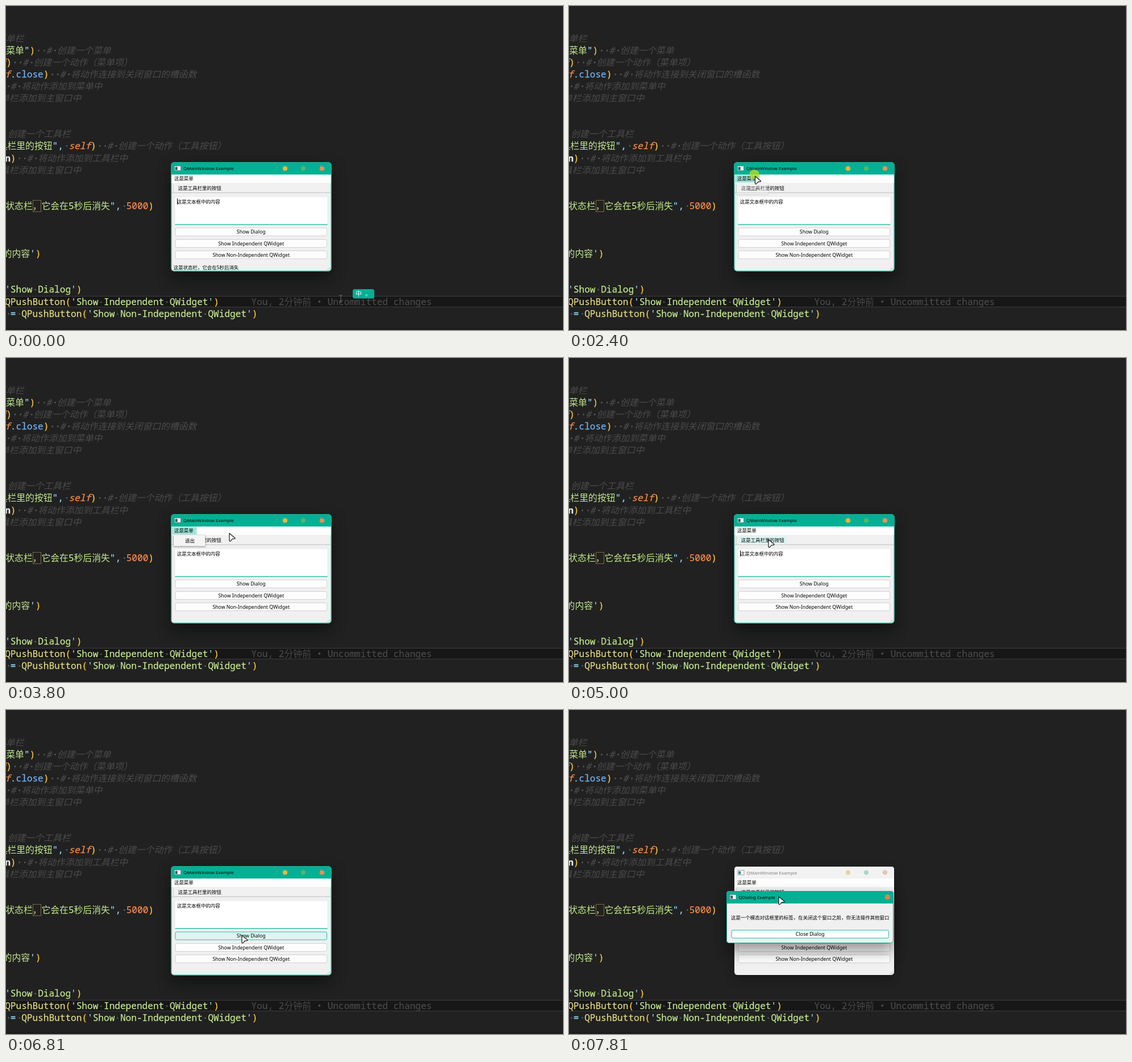
Recreate the animation shown at these times as an HTML page. Size 980 by 571 pixels, loop 8 s.

```html
<!DOCTYPE html>
<html lang="zh-CN">
<head>
<meta charset="utf-8">
<style>
html, body { margin: 0; width: 100%; height: 100%; overflow: hidden; background: #212121; }
svg { display: block; width: 980px; height: 571px; }
text { white-space: pre; }
.code { font: 16.1px 'Noto Sans Mono', 'Noto Sans CJK SC', 'Noto Sans CJK', monospace; stroke-width: .25; }
.han { font-size: 15.8px; stroke: none; }
.space { fill: #5c5c5c; stroke: #5c5c5c; stroke-width: .7; }
.ui { font: 8.45px 'Noto Sans', 'Noto Sans CJK SC', 'Noto Sans CJK', sans-serif; fill: #000; }
.ui .title { font-size: 7.95px; }
.ui .label { font-size: 8.73px; text-anchor: middle; }
</style>
</head>
<body>
<svg viewBox="0 0 980 571">
  <rect width="980" height="571" fill="#212121"/>
  <rect y="567" width="980" height="4" fill="#1d1d1d"/>
  <rect x="-2" y="511.5" width="984" height="19" fill="#171717" stroke="#3c3c3c"/>
  <g id="code" class="code"></g>
  <rect x="47.5" y="342.5" width="14" height="20" fill="none" stroke="#806a35"/>
  <g id="main" class="ui"></g>
  <g id="popup" class="ui"></g>
  <g id="dialog" class="ui"></g>
  <g id="ime" class="ui">
    <rect x="610" y="499" width="38" height="16.5" rx="3.5" fill="#03b094"/>
    <text x="615" y="511" font-size="11" style="fill:#fff">中</text>
    <text x="632" y="511" font-size="11" style="fill:#fff">。</text>
  </g>
  <circle id="ring" r="8.7" fill="#b9da25" opacity=".78"/>
  <g id="pointer">
    <path id="arrow" d="M0 0V12.5Q.6 14.6 2.4 13.2L5.2 9.9 9.4 9.4Q10.6 9 9.6 8Z"
      fill="#fff" stroke="#222" stroke-width="1.3" stroke-linejoin="round"/>
    <path id="beam" d="M-2.5 -6.5Q0 -6.5 0 -5Q0 -6.5 2.5 -6.5M0 -5V5M-2.5 6Q0 6 0 4.5Q0 6 2.5 6"
      fill="none" stroke="#747474"/>
  </g>
</svg>
<script>
const $ = id => document.getElementById(id);
const TEAL = '#03b094', PALE = '#a3e5da', MINT = '#def5f1', FACE = '#f0f0f0';

// ---- editor ----
const STR = '#c3e88d', PUN = '#89ddff', PAR = '#ffc63d', CLS = '#dfd87d', ORG = '#f78c4c',
      FN = '#6fb3f5', DIM = '#4b4b4b', NOTE = '#484848';
const span = (color, s, extra = '') => `<tspan fill="${color}" stroke="${color}" ${extra}>${s
  .replace(/[\u3000-\uffff]+/g, '<tspan class="han">$&</tspan>')
  .replace(/·/g, '<tspan class="space">·</tspan>')}</tspan>`;
const slant = 'font-style="italic"';
const com = s => span(DIM, s, slant);
const str = s => span(STR, s), pun = s => span(PUN, s), par = s => span(PAR, s);
const quoted = s => pun("'") + str(s) + pun("'");
const line = (row, x, ...parts) =>
  `<text x="${x}" y="${(62.6 + 21.09 * row).toFixed(2)}">${parts.join('')}</text>`;

$('code').innerHTML = [
  line(0, -16, com('菜单栏')),
  line(1, .3, str('菜单'), pun('"'), par(')'), com('··#·创建一个菜单')),
  line(2, -9.4, span(ORG, 'f', slant), par(')'), com('··#·创建一个动作（菜单项）')),
  line(3, -1.8, span(ORG, 'f', slant), pun('.'), span(FN, 'close'), par(')'),
    com('··#·将动作连接到关闭窗口的槽函数')),
  line(4, -1.8, com('·#·将动作添加到菜单中')),
  line(5, -10, com('单栏添加到主窗口中')),
  line(8, 3, com('创建一个工具栏')),
  line(9, -13.3, str('具栏里的按钮'), pun('",'), com('·'), span(ORG, 'self', slant), par(')'),
    com('··#·创建一个动作（工具按钮）')),
  line(10, -1.8, span('#eee', 'n', 'font-weight="600"'), par(')'), com('··#·将动作添加到工具栏中')),
  line(11, -10, com('具栏添加到主窗口中')),
  line(14, -.7, str('状态栏，它会在5秒后消失'), pun('",'), com('·'), span(ORG, '5000'), par(')')),
  line(18, -5.4, str('的内容'), pun("'"), par(')')),
  line(21, -1.8, quoted('Show·Dialog'), par(')')),
  line(22, -1.8, span(CLS, 'QPushButton'), par('('), quoted('Show·Independent·QWidget'), par(')')),
  line(22, 431.5, span(NOTE, 'You, 2分钟前 • Uncommitted changes')),
  line(23, -1.8, com('·'), pun('='), com('·'), span(CLS, 'QPushButton'), par('('),
    quoted('Show·Non-Independent·QWidget'), par(')'))
].join('');

// ---- windows ----
const rect = (x, y, w, h, fill, extra = '') =>
  `<rect x="${x}" y="${y}" width="${w}" height="${h}" fill="${fill}" ${extra}/>`;
const text = (x, y, s, extra = '') => `<text x="${x}" y="${y}" ${extra}>${s}</text>`;
const dot = (x, y, r, fill) => `<circle cx="${x}" cy="${y}" r="${r}" fill="${fill}"/>`;
const shadow = (y, blur, a) => `filter:drop-shadow(0 ${y}px ${blur}px rgba(0,0,0,${a}))`;
const button = (x, y, w, label, hot, focus) =>
  rect(x + .5, y + .5, w - 1, 14, hot ? MINT : '#fdfdfd', `rx="2.5" stroke="${hot || focus ? '#1fbfa6' : '#d2d2d2'}"`) +
  text(x + w / 2, y + 10.6, label, 'class="label"');

function frame(x, y, w, h, bar, title, on) {
  const b = y + bar;
  return rect(x, y, w, h, FACE, 'rx="5"') +
    `<path d="M${x} ${b}V${y + 5}q0 -5 5 -5H${x + w - 5}q5 0 5 5V${b}Z" fill="${on ? TEAL : '#f2f2f2'}"/>` +
    (on ? rect(x + .5, y + .5, w - 1, h - 1, 'none', `rx="4.5" stroke="${TEAL}"`) : '') +
    rect(x + 6, y + 6.5, 11, 8, on ? '#f3f8f7' : '#fff', 'stroke="#667" stroke-width=".6"') +
    rect(x + 7.2, y + 8.2, 4, 5.2, on ? '#27605a' : '#2f8f80') +
    text(x + 21.5, y + 13.7, title, `class="title" style="fill:${on ? '#000' : '#808080'}"`);
}

function drawMain(s) {
  const on = s.active, dots = on ? ['#f9b13c', '#54b768', '#fb8a55'] : ['#e4d4a4', '#abd5c9', '#e4c5b3'];
  const edge = on ? 0 : .5;
  let grip = '', handle = '';
  for (let i = 0; i < 6; i++) handle += rect(294, 315 + 2.2 * i, 1, 1, s.tool ? '#e0928a' : '#b5b5b5');
  for (let i = 0; i < 3; i++) for (let j = 0; j <= i; j++)
    grip += rect(569 - 2.2 * j, 460 + 2.2 * i, 1.2, 1.2, '#b8b8b8');
  return frame(290.5 + edge, 275.5 + edge, 282 - 2 * edge, 192 - 2 * edge, 21.5 - edge, 'QMainWindow Example', on) +
    [491, 523, 556].map((x, i) => dot(x, 286.4, 4.2, dots[i])).join('') +
    rect(291.5, 297, 280, 15, '#fdfdfd') +
    (s.menu ? rect(291.5, 297.5, 44, 13.5, PALE) : '') + text(296, 307.4, '这是菜单') +
    rect(291.5, 328.5, 280, 1, '#bdbdbd') + handle +
    (s.tool ? rect(298, 313, 85.5, 15.5, MINT, 'rx="2"') : '') + text(302.8, 324, '这是工具栏里的按钮') +
    rect(297, 336, 269, 50, '#fff', 'rx="2.5" stroke="#e2e2e2" stroke-width=".7"') +
    rect(297.5, 384.5, 268, 1.2, on ? TEAL : '#c9c9c9') +
    text(300.8, 348, '这是文本框中的内容') +
    (s.caret ? rect(301, 339, 1, 11, '#111') : '') +
    button(297.5, 390.5, 267.5, 'Show Dialog', s.hover) +
    button(297.5, 411, 267.5, 'Show Independent QWidget') +
    button(297.5, 431, 267.5, 'Show Non-Independent QWidget') +
    (s.status ? text(294.8, 463.6, '这是状态栏，它会在5秒后消失') : '') + grip;
}

const drawPopup = hot =>
  rect(295, 312, 55.5, 19.3, '#f4f4f4', 'stroke="#dadada" stroke-width=".6"') +
  (hot ? rect(296, 313.5, 53.5, 16.3, PALE) : '') + text(315, 324.7, '退出');

const drawDialog = hot =>
  frame(277, 319, 294, 92, 22, 'QDialog Example', true) +
  dot(560.3, 329.6, 4.6, '#e47f4d') +
  text(285, 368.8, '这是一个模态对话框里的标签，在关闭这个窗口之前，你无法操作其他窗口') +
  button(285.5, 387.5, 277.5, 'Close Dialog', hot, true);

// ---- timeline ----
const path = [
  [1200, 589, 516], [1400, 584, 509], [1600, 520, 450], [2000, 355, 325], [2200, 327, 301],
  [2400, 327.5, 300], [2600, 327.5, 301], [3000, 325, 319], [3200, 338, 319], [3600, 385, 311],
  [3800, 393, 309], [4200, 393, 309], [4600, 351, 320], [5210, 351, 320], [5410, 355, 325],
  [5810, 366, 354], [6010, 366, 354], [6610, 408, 391], [6810, 415, 397], [7210, 415, 397],
  [7610, 384, 350], [7810, 369, 329]
];
const carets = [[0, 400], [800, 1400], [1800, 2400], [4000, 4400], [5000, 5410], [6210, 6610]];

function place(t) {
  const i = path.findIndex(p => p[0] > t);
  if (i === 0) return path[0].slice(1);
  if (i < 0) return path[path.length - 1].slice(1);
  const [t0, x0, y0] = path[i - 1], [t1, x1, y1] = path[i], k = (t - t0) / (t1 - t0);
  return [x0 + (x1 - x0) * k, y0 + (y1 - y0) * k];
}
const inside = (x, y, l, t, r, b) => x >= l && x < r && y >= t && y < b;
const show = (el, on) => el.style.display = on ? '' : 'none';

let last = -1;
function render(ms) {
  const lag = ms >= 5410 ? 10 : 0;
  const t = Math.floor((ms - lag) / 200) * 200 + lag;
  if (t === last) return;
  last = t;
  const [x, y] = place(t), modal = t >= 7210, menu = t >= 2400 && t < 4000;

  $('main').innerHTML = drawMain({
    active: !modal, menu,
    tool: t >= 4400 && inside(x, y, 298, 313, 384, 329),
    hover: !modal && inside(x, y, 298, 390, 565, 406),
    caret: carets.some(c => t >= c[0] && t < c[1]),
    status: t < 2000
  });
  $('main').style = modal ? shadow(6, 9, .32) : shadow(12, 14, .48);

  show($('popup'), menu);
  if (menu) {
    $('popup').innerHTML = drawPopup(t > 2400 && inside(x, y, 295, 313, 350, 331));
    $('popup').style = shadow(1, 1.5, .4) + ';opacity:' + (t < 2600 ? .3 : 1);
  }

  show($('dialog'), modal);
  if (modal) {
    $('dialog').innerHTML = drawDialog(inside(x, y, 286, 388, 563, 403));
    $('dialog').style = shadow(13, 13, t < 7410 ? .35 : .42);
  }

  show($('ime'), t < 1600);
  const beam = !inside(x, y, 290, 275, 573, 468) || (!modal && inside(x, y, 297, 336, 566, 386));
  show($('beam'), beam);
  show($('arrow'), !beam);
  $('pointer').setAttribute('transform', `translate(${x} ${y})`);
  show($('ring'), t === 2400 || t === 7010);
  $('ring').setAttribute('transform', `translate(${x - 1.5} ${y - 3})`);
}

const start = performance.now();
function tick() {
  render((performance.now() - start) % 8000);
  requestAnimationFrame(tick);
}
tick();
</script>
</body>
</html>
```
